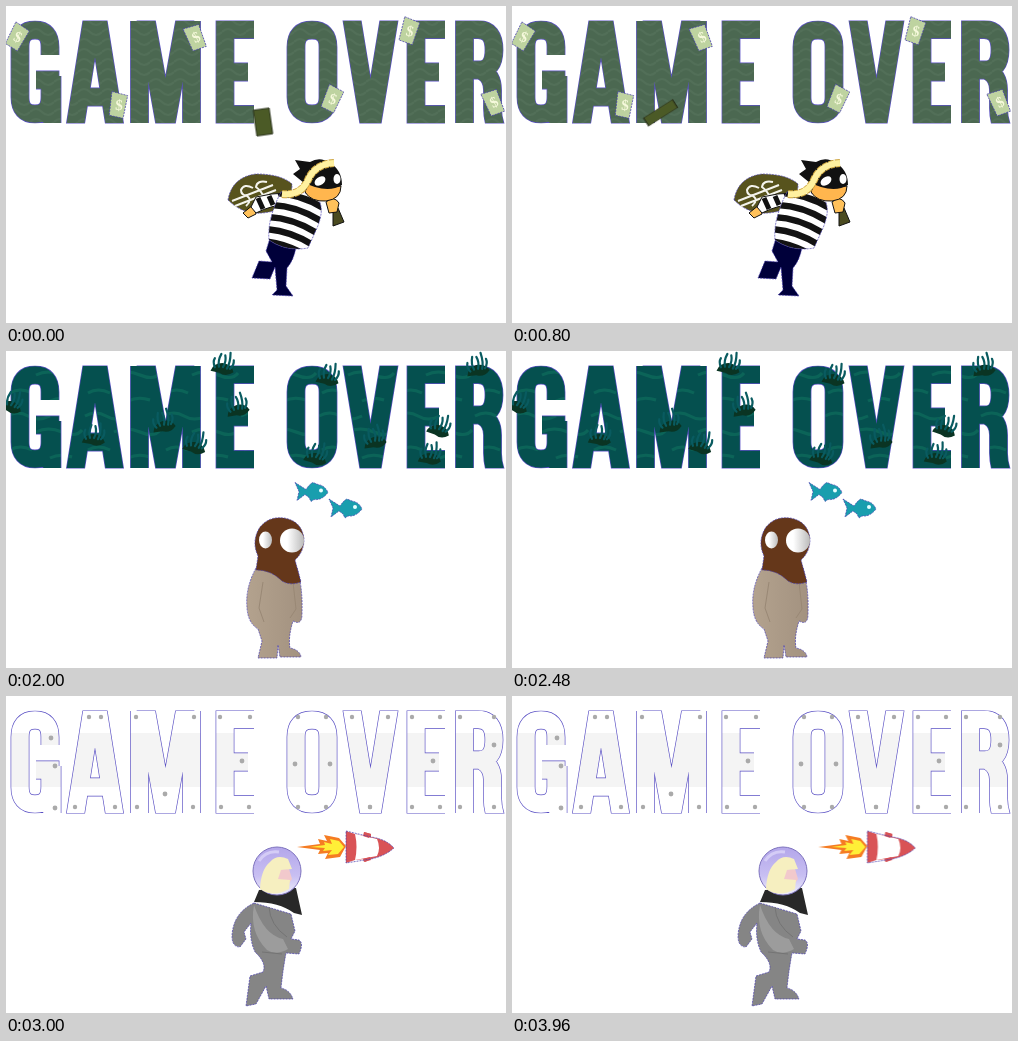
An HTML page for the animation above (4 s loop, 500x317 px).

```html
<!DOCTYPE html>
<html lang="en">
<head>
<meta charset="utf-8">
<title>Game over</title>
<style>
html, body { margin: 0; width: 100%; height: 100%; overflow: hidden; background: #fff; }
svg { display: block; width: 100%; height: 100%; }
.scene { opacity: 0; }
.line { stroke: #453cae; stroke-width: .7; stroke-dasharray: 2 1; }
.ink { stroke: #111; stroke-width: 1; }
.sign { font: bold 15px "Liberation Serif", serif; text-anchor: middle; fill: #f6f9dc; }
</style>
</head>
<body>
<svg viewBox="0 0 500 317" preserveAspectRatio="none" role="img" aria-label="GAME OVER">
<defs>
  <path id="letters" fill="none"/>
  <clipPath id="edge"><path d="M0 14.400H500V117.600H0Z"/></clipPath>
  <clipPath id="band"><path d="M0 15H500V117H0Z"/></clipPath>
  <pattern id="cash" width="24" height="20" patternUnits="userSpaceOnUse">
    <path fill="#4b6851" d="M0 0H24V20H0Z"/>
    <path d="M0 6Q6 0 12 6T24 6M0 16Q6 10 12 16T24 16" fill="none" stroke="#526f58" stroke-width="2"/>
  </pattern>
  <pattern id="choc" width="9" height="30" patternUnits="userSpaceOnUse">
    <path fill="#42291a" d="M0 0H9V30H0Z"/>
    <path d="M2 0V19M6 8V30" stroke="#483020"/>
  </pattern>
  <pattern id="sea" width="78" height="57" patternUnits="userSpaceOnUse">
    <path fill="#05504f" d="M0 0H78V57H0Z"/>
    <path d="M1 8Q12 2 22 8T44 8M30 24Q42 18 56 24T76 22M4 42Q14 36 26 42M44 50Q54 45 66 49" fill="none" stroke="#0b6458" stroke-width="3"/>
  </pattern>
  <pattern id="steel" width="72" height="102" y="15" patternUnits="userSpaceOnUse">
    <path fill="#fff" d="M0 0H72V102H0Z"/><path fill="#f4f4f4" d="M0 22H72V76H0Z"/>
  </pattern>
  <linearGradient id="suit" x2="1"><stop stop-color="#b3a28e"/><stop offset="1" stop-color="#a39280"/></linearGradient>
  <linearGradient id="lens" x2="1"><stop offset=".3" stop-color="#fff"/><stop offset="1" stop-color="#bbb"/></linearGradient>
  <linearGradient id="glass" x2="0" y2="1"><stop stop-color="#b3a6ea"/><stop offset=".6" stop-color="#c8bff2"/><stop offset="1" stop-color="#efeffa"/></linearGradient>
  <clipPath id="torso"><path id="shirt" d="M275 186Q298 183 312 193Q319 203 311 222L302 242Q280 246 263 234Q261 213 275 186Z"/></clipPath>
  <g id="note">
    <path fill="#bed3a0" class="line" d="M-8-13L8-10L5 13L-9 11Z"/><text class="sign" y="5">$</text>
  </g>
  <g id="cupcake">
    <path fill="#c88d9d" d="M-9 3L-5 15L7 14L11 2Z"/>
    <path fill="#f4b5dc" class="line" d="M-12 6Q-15-1-7-4Q-7-10 0-9Q8-9 9-3Q16 2 11 6Q4 3 0 7Q-6 4-12 6Z"/>
    <path d="M-8 1L-5-2M-2-5L1-3M3 2L6-1M-1 3L-3 1" stroke="#5b2342" stroke-width="2"/>
    <circle cx="2" cy="-9" r="3" fill="#e81946"/>
  </g>
  <path id="cookie" fill="#eed19b" stroke="#4a2d16" d="M-5-4L2-7L5-1L3 6L-3 5L-5 2Z"/>
  <path id="chunk" fill="#2a180e" stroke="#4b301f" d="M-6-8L5-10L6 8L-5 9ZM-6-2L5-4M-5 4L6 2M0-9V8"/>
  <g id="weed">
    <path fill="#0a3423" d="M-11 5Q-9-3 0-4Q9-4 12 4Q5 10-2 6Z"/>
    <path d="M-7 1Q-10-4-8-8M-3 0Q-5-6-2-13M1 0Q4-6 2-12M5 1Q8-5 7-15M8 1Q12-3 11-8" fill="none" stroke="#095b60" stroke-width="2.2" stroke-linecap="round"/>
  </g>
  <g id="swimmer">
    <path fill="#199eae" class="line" d="M0-9L11-2Q15-8 18-9L23-7Q30-6 33 1Q27 9 19 8L16 10L14 6L10 3L2 9L4 0Z"/>
    <circle cx="26" cy="-1" r="2" fill="#e7ffff"/>
  </g>
</defs>

<g class="scene" data-paint="cash">
  <g id="notes"></g>
  <path id="bill" d="M-8-13H8V13H-8Z" fill="#4b5a26" stroke="#28301a"/>
  <g class="line">
    <path fill="#00003a" d="M264 232L290 241Q288 254 281 262L280 280L287 290L266 289L271 284L269 261L264 273L246 272L253 255L266 256L260 245Z"/>
    <path fill="#57531d" d="M222 194Q226 171 250 168Q275 168 286 178Q286 202 263 206Q239 211 222 194Z"/>
  </g>
  <path d="M226 195L267 179M229 200L270 184M247 182Q238 177 235 184Q235 189 241 190Q247 194 240 200M261 176Q251 174 250 181Q260 188 256 196" fill="none" stroke="#f4f4ec" stroke-width="2"/>
  <path fill="#ffc15a" class="ink" d="M237 207L247 199L250 208L242 212Z"/>
  <path fill="#fff" class="ink" d="M245 201L250 191Q266 187 281 187L284 198Q265 199 250 207Z"/>
  <path d="M252 192L257 203M263 190L267 199M274 187L278 197" stroke="#111" stroke-width="5"/>
  <g clip-path="url(#torso)">
    <path fill="#fff" d="M255 180H325V250H255Z"/>
    <g id="stripes" fill="none" stroke="#131313" stroke-width="6.5"></g>
  </g>
  <use href="#shirt" fill="none" class="line"/>
  <path fill="#4b4b20" class="ink" d="M327 203L332 202L338 216L327 220Z"/>
  <path fill="#ffc15a" class="ink" d="M320 196Q328 189 333 197L331 206L323 207Z"/>
  <path fill="#ffb64e" class="ink" d="M303 176Q320 183 335 180Q335 193 320 195Q305 196 299 186Z"/>
  <path fill="#111" d="M289 154L304 156Q314 150 324 157Q336 164 336 179Q325 186 309 181L298 177L287 168L294 163Z"/>
  <ellipse cx="314" cy="175" rx="6" ry="4" fill="#fff" transform="rotate(-35 314 175)"/>
  <ellipse cx="331" cy="173" rx="3.5" ry="5" fill="#fff"/>
  <path d="M276 188Q295 190 302 174T328 157" fill="none" stroke="#cda43d" stroke-width="8" stroke-dasharray="5 1"/>
  <path d="M276 188Q295 190 302 174T328 157" fill="none" stroke="#fff1a0" stroke-width="6"/>
</g>

<g class="scene" data-paint="choc">
  <path fill="#3a2315" d="M15 112H26V121Q25 127 23 117Q20 121 17 116ZM45 110H54V127Q51 131 48 123ZM212 112H222V121Q216 124 212 117ZM283 112H294V120Q290 126 286 115ZM363 112H371V121Q367 125 363 114ZM403 112H416V119Q411 123 406 119ZM476 112H486V121Q481 125 476 117ZM366 35Q378 23 376 43L369 60Z"/>
  <use href="#cupcake" x="211" y="13"/><use href="#cupcake" x="434" y="10"/>
  <use href="#cookie" x="12" y="26"/><use href="#cookie" x="327" y="39"/><use href="#cookie" x="493" y="52"/>
  <use href="#chunk" x="50" y="88"/><use href="#chunk" x="284" y="87"/><use href="#chunk" x="480" y="99"/>
  <path fill="#fff" class="line" d="M235 115Q235 105 245 107Q247 98 256 102Q264 94 270 102Q280 101 277 111L273 126Q274 146 288 157L286 166L254 170Q255 137 247 120Z"/>
  <path fill="#555" d="M251 126L258 163L263 162ZM260 124L266 162L271 161ZM267 124L274 160L279 159Z"/>
  <path fill="#ffc66a" d="M258 167L285 165L288 177L285 188Q273 195 260 187L253 174Z"/>
  <path fill="#ffdf68" d="M254 164L287 160L288 170Q280 164 275 169Q269 165 266 171L261 184L255 181L252 171Z"/>
  <circle cx="271" cy="174" r="5.500" fill="#fff"/><circle cx="273" cy="174" r="2" fill="#253888"/>
  <path d="M277 182L286 180" stroke="#a45c2a"/>
  <path fill="#fff" class="line" d="M263 191Q248 199 246 219Q243 243 256 252H302Q319 240 318 222Q314 201 291 191Z"/>
  <path fill="#d83f18" d="M258 185Q276 194 293 187L295 199L284 195L289 203L277 195Q264 195 258 185Z"/>
  <path d="M296 211h0M300 221h0M303 232h0" stroke="#111" stroke-width="3.600" stroke-linecap="round"/>
  <path d="M298 206Q306 220 309 239" fill="none" stroke="#333"/>
  <path fill="#ffbd72" d="M263 233L274 229L285 234L278 237L287 240L278 241L286 246L276 246L280 251L268 249ZM314 221L320 225L319 235L314 234Z"/>
  <path fill="#2d0f08" d="M257 251H303L296 292H291L283 268L279 292H267Z"/>
  <path fill="#2d0f08" d="M275 255H300L295 292H279Z"/>
  <path fill="#111" d="M266 297L281 290H292L304 296V299H267Z"/>
  <path fill="#e77b20" class="line" d="M213 292Q210 277 221 270L226 264L236 267Q247 260 259 267Q269 277 266 293L268 301L254 307L243 304L250 297Q243 285 235 294L229 305L217 303Z"/>
  <path d="M219 276L229 281M216 284L226 288M229 267L231 275M241 266L239 279M250 266L247 279M261 274L253 283M265 284L255 288M264 294L255 295M218 295L227 297" stroke="#6f3113" stroke-width="2"/>
</g>

<g class="scene" data-paint="sea">
  <g id="weeds"></g>
  <g id="fish"><use href="#swimmer" x="289" y="140.500"/><use href="#swimmer" x="323" y="157"/></g>
  <path fill="url(#suit)" class="line" d="M250 217Q239 237 241 257Q242 272 252 278L256 290L252 307H271L272 294L274 306H295Q294 299 284 297Q282 286 287 270Q296 275 296 263Q297 237 291 217Z"/>
  <path d="M257 231L253 257L258 271M287 231L290 258L284 267" fill="none" stroke="#998875"/>
  <path fill="#65371a" class="line" d="M252 205Q245 190 254 176Q263 165 278 167Q296 170 298 188Q298 201 289 209L295 231Q284 235 276 230Q265 219 250 219Z"/>
  <ellipse cx="259.500" cy="189" rx="6.500" ry="8.500" fill="url(#lens)"/>
  <circle cx="286" cy="189.500" r="12" fill="url(#lens)"/>
</g>

<g class="scene" data-paint="steel">
  <g id="rivets" fill="#aaa"></g>
  <path fill="#858585" class="line" d="M248 207Q227 217 226 240Q226 251 234 251L240 243L238 236L245 227Q243 243 249 256Q261 267 257 276L244 280L240 310L250 308L260 290L263 303H287Q284 294 275 292Q277 273 280 257L293 258Q298 247 293 244L285 243L289 235L285 218Z"/>
  <path fill="#9c9c9c" d="M248 209Q258 239 277 243L282 253Q270 260 261 254Q243 236 248 209Z"/>
  <path d="M263 211Q264 229 281 241M256 256L276 258" fill="none" stroke="#747474"/>
  <path fill="#282828" d="M253 194L290 192L296 219L288 217Q273 206 248 206Z"/>
  <circle cx="271" cy="175" r="24" fill="url(#glass)" stroke="#7d72bd"/>
  <path fill="#f2c9cc" d="M270 174L283 173L286 183L279 193L266 189Z"/>
  <path fill="#f6efc0" d="M254 193Q255 173 264 166Q271 158 282 163L286 173L275 174L272 183L284 184L283 193Q267 202 254 193Z"/>
  <path d="M253 165Q260 154 273 156" fill="none" stroke="#d4ccf6" stroke-width="3"/>
  <g id="rocket">
    <path fill="#f57c23" d="M291 151L314 148L312 143L321 145L318 139L333 142L340 150L334 161L319 163L322 157L312 158L314 154Z"/>
    <path fill="#ffef37" d="M304 151L319 149L318 146L326 148L324 143L333 145L338 151L332 158L322 159L326 154L317 155L319 152Z"/>
    <path fill="#d95356" d="M340 135L349 138L358 140V136L365 138V141Q380 143 388 152Q379 160 365 163L359 166V163L349 164L340 167Z"/>
    <path fill="#fff" d="M349 138L371 143Q375 152 371 160L349 164Q352 151 349 138Z"/>
    <path fill="#d95356" d="M358 136L365 138L363 142L357 140ZM357 163L364 161L365 164L358 166Z"/>
    <path fill="none" class="line" d="M340 135L365 141Q380 143 388 152Q379 160 365 163L340 167Z"/>
  </g>
</g>
</svg>
<script>
const LOOP = 4000, SCENE = 1000, STEPS = 25;
const byId = id => document.getElementById(id);
const fill = (id, items, draw) => { byId(id).innerHTML = items.map(draw).join(''); };

// Letters are thick strokes; slanted ones overshoot and are clipped flat
const slants = (center, top, bottom) =>
  [-1, 1].map(side => `M${center + side * top} 5L${center + side * bottom} 127`).join('');
const letterE = x => `M${x + 38} 23.5H${x + 9}V108.5H${x + 38}M${x + 9} 66H${x + 32}`;
byId('letters').setAttribute('d', [
  'M44 49V41Q44 24 29 24T14 41V91Q14 108 29 108T44 91V74H30M46 70V117',
  slants(89, 1.5, 21) + 'M75 91H103',
  'M133.5 15V117M185.500 15V117' + slants(159.5, 21, -1),
  letterE(210),
  'M290 41Q290 24 306 24T322 41V91Q322 108 306 108T290 91Z',
  slants(364.5, 20, 0),
  letterE(401),
  'M458.5 117V23.5H472Q488 23.500 488 44T472 64H458M476 65Q486.500 70 486.500 84V102Q486.500 112 490 122'
].join(''));

const scenes = [...document.querySelectorAll('.scene')];
scenes.forEach(scene => scene.insertAdjacentHTML('afterbegin', `
  <use href="#letters" clip-path="url(#edge)" stroke="#5a50c4" stroke-width="18.8"/>
  <use href="#letters" clip-path="url(#band)" stroke="url(#${scene.dataset.paint})" stroke-width="17.5"/>`));

const place = (name, spread) => ([x, y], i) =>
  `<use href="#${name}" transform="translate(${x} ${y}) rotate(${spread * Math.sin(i * 2 + 1)})"/>`;
fill('notes', [[12, 31], [113, 99], [190, 31], [327, 93], [404, 25], [488, 96]], place('note', 28));
fill('weeds', [[4, 54], [87, 87], [157, 74], [188, 95], [216, 16], [231, 58], [321, 27],
  [309, 106], [368, 90], [423, 106], [432, 78], [471, 18]], place('weed', 15));
fill('stripes', [0, 1, 2, 3, 4], i => {
  const x = 270 - 4 * i, y = 187 + 12 * i;
  return `<path d="M${x} ${y}Q${x + 25} ${y + 1} ${x + 49} ${y + 16}"/>`;
});

// Rivet pairs sit near both ends of each letter: center, top and bottom half-widths
fill('rivets', [[89, 6, 20], [159, 29, 28], [229, 15, 14], [306, 14, 14], [364, 18, 0], [420, 14, 14], [471, 17, 17]],
  ([center, top, bottom]) => [-1, 1].map(side => `
    <circle cx="${center + side * top}" cy="21" r="2.2"/>
    <circle cx="${center + side * bottom}" cy="111" r="2.2"/>`).join(''));
fill('rivets', [byId('rivets').innerHTML, ...[[45, 42], [49, 70], [49, 112], [159, 98], [236, 65], [289, 68], [324, 68], [427, 65], [488, 49]]
  .map(([x, y]) => `<circle cx="${x}" cy="${y}" r="2.4"/>`)], markup => markup);

const play = (el, frames) => el.animate(frames.map(frame => ({ ...frame, easing: 'step-end' })),
  { duration: LOOP, iterations: Infinity });

// Each scene owns a quarter of the loop
scenes.forEach((scene, i) => play(scene, [0, 1, 2, 3, 4].map(k =>
  ({ offset: k / 4, opacity: k === i ? 1 : 0 }))));

// Samples a pose over one scene, with u running from 0 to 1
const track = (id, scene, pose) => play(byId(id), Array.from({ length: STEPS + 1 }, (_, i) =>
  ({ offset: (scene + i / STEPS) * SCENE / LOOP, transform: pose(i / STEPS) })));

track('bill', 0, u => {
  const x = 206 + 63 * Math.cos(4.18 * (u - 0.15));
  const y = 116 - 50 * Math.abs(Math.sin(Math.PI * u / 0.85));
  return `translate(${x}px, ${y}px) rotate(${82 * u - 8}deg) scale(${1 - 0.5 * u}, ${1 + 0.4 * u})`;
});
track('fish', 2, u => `translateX(${16.6 * u}px)`);
track('rocket', 3, u => `translateX(${16 * u}px)`);
</script>
</body>
</html>
```
